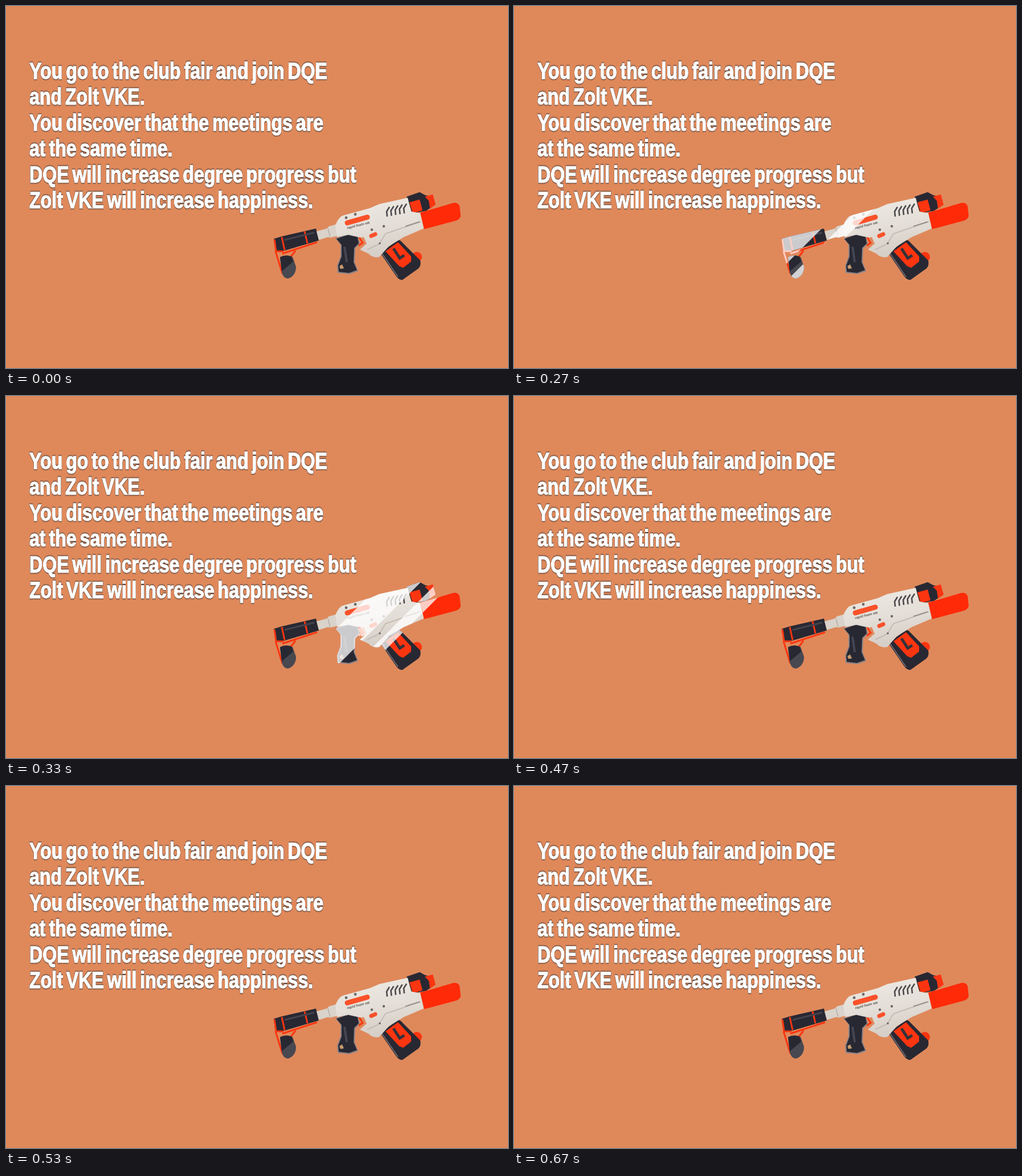
These frames come from a looping animation (881x636 px, 940 ms). An HTML page:

```html
<!DOCTYPE html>
<html lang="en">
<head>
<meta charset="utf-8">
<title>Club fair</title>
<style>
  html, body { margin: 0; width: 100%; height: 100%; overflow: hidden; background: #df895b; }
  svg { display: block; width: 881px; height: 636px; }
  #story {
    font: bold 41px "Liberation Sans", Arial, sans-serif;
    word-spacing: -3.8px;
    fill: #fff; stroke: #fff; stroke-width: 1.5;
    filter: drop-shadow(0 0 .8px #2b211e) drop-shadow(0 0 .9px #4a3a34);
  }
  .navy { fill: #282833; }
  .red { fill: #fb3510; }
  .line { fill: none; stroke: #fb3510; stroke-width: 3; }
  .tiny { font: italic bold 6px "Liberation Sans", Arial, sans-serif; fill: #5c5551; }
</style>
</head>
<body>
<svg viewBox="0 0 881 636">
  <defs>
    <linearGradient id="shell" x1="0" y1="0" x2=".25" y2="1">
      <stop offset="0" stop-color="#efebe5"/>
      <stop offset=".55" stop-color="#e4dfd8"/>
      <stop offset="1" stop-color="#d6cfc8"/>
    </linearGradient>
    <filter id="whiten" filterUnits="userSpaceOnUse" x="440" y="310" width="380" height="190">
      <feColorMatrix values="0 0 0 0 1  0 0 0 0 1  0 0 0 0 1  0 0 0 1 0"/>
    </filter>
    <mask id="shape" maskUnits="userSpaceOnUse" x="440" y="310" width="380" height="190">
      <use href="#blaster" filter="url(#whiten)"/>
    </mask>
  </defs>

  <rect width="881" height="636" fill="#df895b"/>

  <g id="blaster">
    <!-- stock -->
    <path class="line" d="M473 431L485 470M485 435L546 415M508 430L494 448"/>
    <path d="M481 442Q491 436 503 441L509 458Q509 474 495 479Q486 478 484 468Z" fill="#484850"/>
    <path class="navy" d="M481 441Q491 436 501 440L504 449L484 466Z"/>
    <path class="navy" d="M470 409L483 405L544 391L549 412L488 430L473 432Z"/>
    <path class="line" d="M471 410L474 431L487 431M484 406L489 429M524 396L529 417"/>
    <path d="M489 411L541 398" stroke="#44444e" stroke-width="3"/>
    <path d="M545 396L563 391L567 387L582 383L585 403L569 407L565 406L549 411Z" fill="#d9d3cb"/>
    <path d="M565 391L569 406" stroke="#b7aea6" stroke-width="1.5"/>

    <!-- grip -->
    <path d="M578 408L600 401L618 405L621 418L613 426L612 450L618 466L603 471L582 469L581 456L587 440L587 419Z" fill="#8b8387"/>
    <path class="navy" d="M580 409L600 402L617 406L619 417L611 425L610 450L616 464L602 469L584 467L583 456L589 440L589 420Z"/>
    <path d="M594 423L598 450" stroke="#454653" stroke-width="4"/>
    <path d="M585 457L590 454L593 461L587 462Z" fill="#c49a70"/>

    <!-- front barrel, magazine, nozzle -->
    <path class="navy" d="M703 335L726 327L735 332L745 335L746 354L737 360L713 364Z"/>
    <path class="red" d="M708 345L726 340L731 359L714 364ZM735 335L749 331L754 349L744 356L742 342Z"/>
    <circle class="red" cx="721" cy="441" r="9"/>
    <path class="navy" d="M657 434L688 411Q692 411 696 416L727 447Q729 456 724 461L696 481Q690 482 685 475Z"/>
    <path class="red" d="M666 431L688 415L711 440L711 449L697 460L690 457Z"/>
    <path d="M680 426L691 443L699 438" fill="none" stroke="#33323a" stroke-width="5"/>
    <path d="M660 435L688 476" stroke="#77727a" stroke-width="1.5"/>
    <path d="M727 363L785 346Q793 345 796 351L798 369Q797 374 790 377L734 392Z" fill="#ff2a08"/>

    <!-- body -->
    <path d="M578 385Q584 370 592 368L639 355L655 348L705 337L711 361L727 364L733 391L698 406L672 422L655 441Q643 443 636 435L621 428L629 421L624 407L601 402L581 406Z" fill="url(#shell)"/>
    <path d="M618 408L628 406L633 418L624 423Z" fill="#df895b"/>
    <path d="M620 407L626 416L619 421" class="line"/>
    <path d="M655 418L666 400L728 379M634 428L655 418" fill="none" stroke="#c4bcb5" stroke-width="2"/>
    <path d="M701 387L726 379" stroke="#8c8581" stroke-width="1.5"/>
    <path d="M599 381L634 371" stroke="#f9512a" stroke-width="9" stroke-linecap="round"/>
    <path d="M641 404L648 401" stroke="#f9512a" stroke-width="7" stroke-linecap="round"/>
    <text class="tiny" transform="translate(599 392) rotate(-14)">rapid foam mk</text>
    <g id="vents" fill="none" stroke="#4c4a4d" stroke-width="2.6"/>
    <g fill="#6d6766">
      <circle cx="597" cy="372" r="2.4"/><circle cx="613" cy="366" r="2.4"/>
      <circle cx="642" cy="393" r="2.2"/><circle cx="663" cy="387" r="2.2"/>
      <circle cx="656" cy="417" r="1.8"/>
    </g>
  </g>

  <g mask="url(#shape)">
    <!-- a wide and a narrow diagonal streak -->
    <g id="glint" fill="#fff" fill-opacity=".76">
      <path d="M564 300H631L431 500H364Z"/>
      <path d="M661 300H688L488 500H461Z"/>
    </g>
  </g>

  <g id="story" transform="translate(41 128) scale(.783 1)"></g>
</svg>
<script>
  const NS = "http://www.w3.org/2000/svg";
  const byId = id => document.getElementById(id);
  const LOOP = 940, STEP = 124;
  const SWEEP = [270, 330, 400, 470];

  function add(parent, tag, attrs, text = "") {
    const node = document.createElementNS(NS, tag);
    for (const key in attrs) node.setAttribute(key, attrs[key]);
    node.textContent = text;
    parent.appendChild(node);
  }

  [
    "You go to the club fair and join DQE",
    "and Zolt VKE.",
    "You discover that the meetings are",
    "at the same time.",
    "DQE will increase degree progress but",
    "Zolt VKE will increase happiness."
  ].forEach((line, i) => add(byId("story"), "text", { x: 0, y: i * 45.4 }, line));

  for (let i = 0; i < 5; i++) {
    add(byId("vents"), "path", { d: `M${673 + i * 7.5} ${353 - i * 1.4}l-5 8l1 9` });
  }

  // The streaks jump by a fixed distance at each step.
  function draw(time) {
    const t = time % LOOP;
    const step = SWEEP.filter(start => t >= start).length - 1;
    const glint = byId("glint");
    const on = step >= 0 && step < SWEEP.length - 1;
    glint.setAttribute("visibility", on ? "visible" : "hidden");
    glint.setAttribute("transform", `translate(${step * STEP} 0)`);
  }

  const begin = performance.now();
  function tick() {
    draw(performance.now() - begin);
    requestAnimationFrame(tick);
  }
  tick();
</script>
</body>
</html>
```
